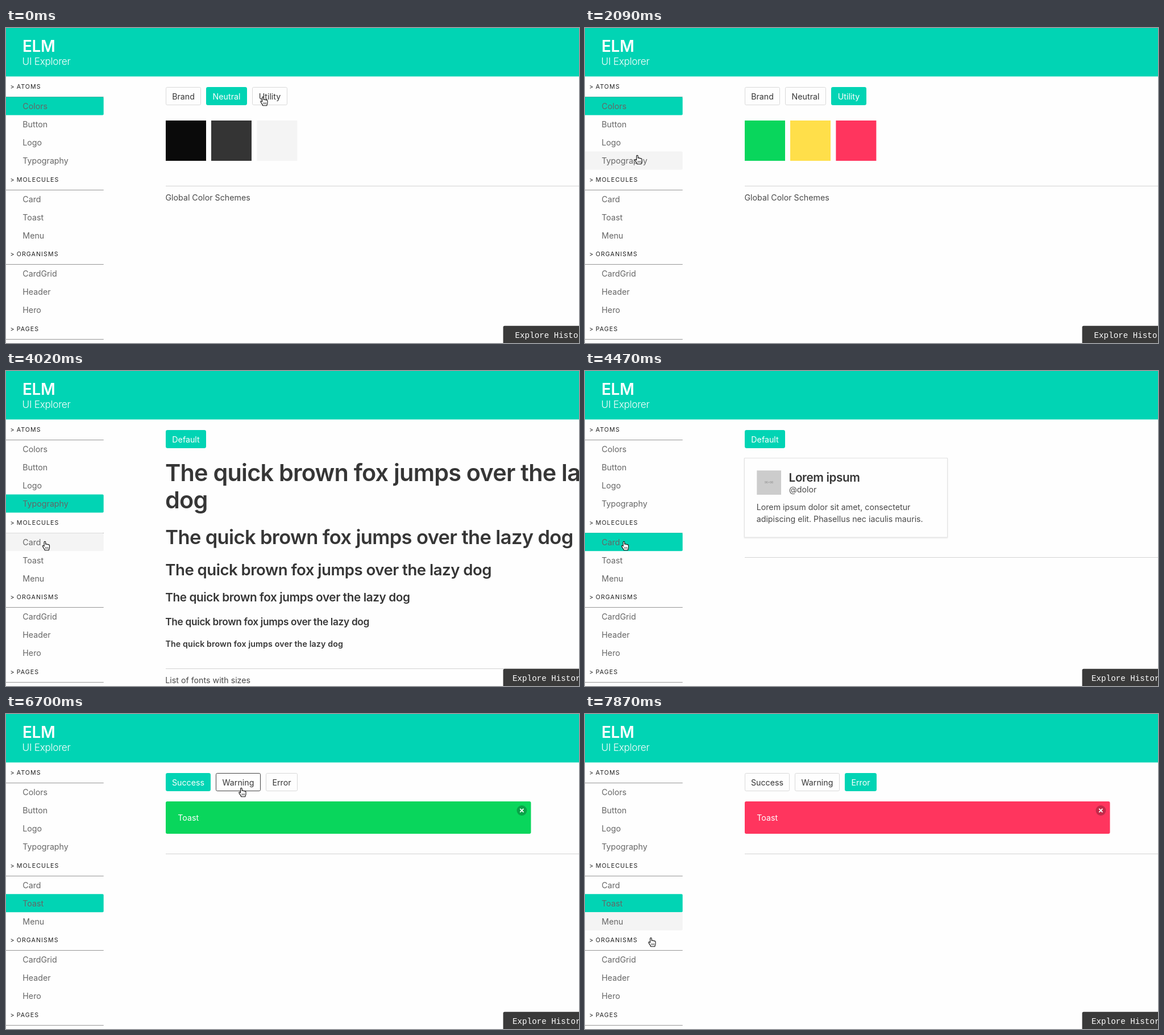
An HTML page that plays this animation: 1008x555 px, repeating every 8000 ms.

```html
<!DOCTYPE html>
<html lang="en">
<head>
<meta charset="utf-8">
<title>UI Explorer</title>
<style>
  html, body { margin: 0; width: 100%; height: 100%; overflow: hidden; background: #fefefe; }
  svg { display: block; width: 1008px; height: 555px; }
  text { font: 14.22px Inter, "Open Sans", sans-serif; font-optical-sizing: none; fill: #4a4a4a; white-space: pre; }
  .brand { font-size: 28px; font-weight: 600; letter-spacing: -.015em; fill: #fff; }
  .tagline { font-size: 17.3px; font-weight: 300; letter-spacing: -.018em; fill: #fff; }
  .label { font-size: 10.67px; letter-spacing: .1em; fill: #222; }
  .item text { fill: #666; }
  .item rect { fill: none; }
  .item.hover rect { fill: #f4f4f4; }
  .item.active rect { fill: #01d4b4; }
  .tab rect { fill: #fefefe; stroke: #d9d9d9; }
  .tab text { fill: #363636; }
  .tab.hover rect { stroke: #444; }
  .tab.active rect { fill: #01d4b4; stroke: #01d4b4; }
  .tab.active.hover rect { fill: #00c6a9; stroke: #00c6a9; }
  .tab.active text { fill: #fff; }
  .title { font-weight: 600; letter-spacing: -.0187em; fill: #363636; }
  .small { font-weight: 600; letter-spacing: .0088em; fill: #363636; }
  .tiny { font-size: 5px; fill: #8a8a8a; }
  .history { font: 14.22px "Liberation Mono", monospace; fill: #fff; }
  .card { filter: drop-shadow(0 1.8px 1.3px rgba(10, 10, 10, .1)); }
</style>
</head>
<body>
<svg id="stage" viewBox="0 0 1008 555"></svg>
<script>
const stage = document.getElementById('stage');

function add(parent, tag, attrs = {}, content) {
  const node = document.createElementNS('http://www.w3.org/2000/svg', tag);
  for (const key in attrs) node.setAttribute(key, attrs[key]);
  if (content) node.textContent = content;
  return parent.appendChild(node);
}
const group = (parent, cls = '') => add(parent, 'g', { class: cls });
const box = (parent, x, y, width, height, attrs) =>
  add(parent, 'rect', { x, y, width, height, ...attrs });
const label = (parent, x, y, content, cls = '', size) =>
  add(parent, 'text', { x, y, class: cls, ...(size && { style: `font-size:${size}px` }) }, content);
const rule = (parent, y) => box(parent, 281, y, 727, 1, { fill: '#d3d3d3' });

// Header
box(stage, 0, 0, 1008, 85.4, { fill: '#01d4b4' });
label(stage, 29, 42, 'ELM', 'brand');
label(stage, 28.5, 65, 'UI Explorer', 'tagline');

// Sidebar
const items = {};
function section(name, y, names) {
  label(stage, 7.5, y + 4, '>', 'label');
  label(stage, 18.7, y + 4, name, 'label');
  box(stage, 0, Math.floor(y + 18.4), 171.7, 1, { fill: '#969696' });
  names.forEach((itemName, i) => {
    const top = y + 18.6 + i * 32;
    const item = items[itemName] = group(stage, 'item');
    box(item, -4, top, 175.7, 32, { rx: 1.8 });
    label(item, 29.3, top + 21.3, itemName);
  });
}
section('ATOMS', 103, ['Colors', 'Button', 'Logo', 'Typography']);
section('MOLECULES', 266.7, ['Card', 'Toast', 'Menu']);
section('ORGANISMS', 398.4, ['CardGrid', 'Header', 'Hero']);
section('PAGES', 530, []);

// Scenes
const scenes = {}, tabs = {};
function scene(name, ...tabList) {
  const g = scenes[name] = group(stage);
  for (const [tabName, x, width] of tabList) {
    const tab = tabs[name + tabName] = group(g, 'tab');
    box(tab, x + .5, 104.5, width - 1, 31, { rx: 2.2 });
    add(tab, 'text', { x: x + width / 2, y: 125.6, 'text-anchor': 'middle' }, tabName);
  }
  return g;
}

const colors = scene('Colors', ['Brand', 281, 62], ['Neutral', 352, 72], ['Utility', 433, 62]);
const swatches = [281, 361, 441.4].map(x => box(colors, x, 163, 71, 71));
rule(colors, 278);
label(colors, 280.5, 304, 'Global Color Schemes');
const palettes = {
  Neutral: ['#0a0a0a', '#343434', '#f4f4f4'],
  Utility: ['#09d65c', '#ffdf4a', '#ff355e']
};

const typography = scene('Typography', ['Default', 281, 71]);
const pangram = 'The quick brown fox jumps over the lazy';
label(typography, 280, 194, pangram, 'title', 41.4);
label(typography, 280, 242, 'dog', 'title', 41.4);
for (const [y, size] of [[305.3, 34.5], [359.6, 27.6], [406, 20.7], [447.5, 17.25]])
  label(typography, 280.3, y, pangram + ' dog', 'title', size);
label(typography, 280.5, 485.7, pangram + ' dog', 'small');
rule(typography, 524);
label(typography, 280.3, 550, 'List of fonts with sizes');

const card = scene('Card', ['Default', 281, 71]);
box(card, 280.5, 153.5, 357, 139.5, { fill: '#fefefe', stroke: '#e2e2e2', class: 'card' });
box(card, 302.3, 175.3, 42.7, 42.7, { fill: '#ccc' });
add(card, 'text', { x: 323.6, y: 198, class: 'tiny', 'text-anchor': 'middle' }, '96×96');
label(card, 358.6, 195, 'Lorem ipsum', 'title', 20.7);
label(card, 359, 213.5, '@dolor');
label(card, 301.7, 245, 'Lorem ipsum dolor sit amet, consectetur');
label(card, 301.7, 266.3, 'adipiscing elit. Phasellus nec iaculis mauris.');
rule(card, 328);

const toast = scene('Toast', ['Success', 281, 79], ['Warning', 369, 79], ['Error', 457, 56]);
const banner = box(toast, 281, 154, 642.5, 57, { rx: 2.7 });
const message = label(toast, 302.3, 188, 'Toast');
add(toast, 'circle', { cx: 907.4, cy: 170, r: 8.9, fill: 'rgba(10,10,10,.25)' });
add(toast, 'path', { d: 'M904.3 166.9l6.2 6.2m0-6.2l-6.2 6.2', stroke: '#fff', 'stroke-width': 1.9 });
rule(toast, 246);
const toastFill = { Success: '#09d65c', Warning: '#ffdf4a', Error: '#ff355e' };

// History button
box(stage, 874.6, 524.7, 160, 40, { rx: 2.7, fill: '#3a3a3a' });
const history = label(stage, 895.5, 545.5, 'Explore History', 'history');

// Pointer
const pointer = group(stage);
add(pointer, 'path', {
  d: 'M-3.4-6.3c0-1.8 2.6-1.8 2.6 0v3.6c.4-1 2.3-.8 2.4.4.5-.8 2.2-.6 2.3.6.6-.7 2.1-.4 2.1 1V3' +
     'c0 1.8-1 2.6-1.2 4.8H-2.2C-2.6 5.6-4.8 3.6-6 1.2c-.7-1.5 1-2.2 2-1l.6.8z',
  fill: '#fff', stroke: '#111', 'stroke-width': 1.1, 'stroke-linejoin': 'round'
});
add(pointer, 'path', { d: 'M-.9 2.2v3.2M1.2 2.2v3.2M3.3 2.2v3.2', stroke: '#111', 'stroke-width': .8 });

// Time in ms, pointer centre, and what changes from there on
const cues = [
  [0, 454, 129, { page: 'Colors', tab: 'Neutral', hover: '' }],
  [140, 455, 129, { tab: 'Utility', hover: 'Utility' }],
  [320, 456, 129],
  [470, 457, 129],
  [620, 432, 133, { hover: '' }],
  [770, 300, 150],
  [910, 155, 168, { hover: 'Button' }],
  [1060, 116, 173],
  [1210, 113, 174],
  [1660, 112, 180],
  [1800, 106, 202, { hover: 'Logo' }],
  [1950, 98, 225, { hover: 'Typography' }],
  [2090, 94, 232],
  [2390, 94, 232, { page: 'Typography', tab: 'Default' }],
  [2990, 96, 232],
  [3140, 100, 232],
  [3290, 102, 232],
  [3580, 100, 240],
  [3725, 92, 264, { hover: '' }],
  [3870, 78, 294, { hover: 'Card' }],
  [4020, 70.5, 308],
  [4320, 70.5, 308, { page: 'Card' }],
  [4920, 71, 310],
  [5070, 70, 317],
  [5220, 69, 325, { hover: 'Toast' }],
  [5370, 67, 331],
  [5510, 65, 334],
  [5660, 64, 335],
  [5950, 64, 335, { page: 'Toast', tab: 'Success' }],
  [6100, 72, 332],
  [6250, 130, 296, { hover: '' }],
  [6400, 240, 220],
  [6550, 360, 156],
  [6700, 416, 138, { hover: 'Warning' }],
  [6850, 420, 135, { tab: 'Warning' }],
  [6990, 432, 131],
  [7140, 478, 128, { hover: 'Error' }],
  [7290, 484, 129, { tab: 'Error' }],
  [7430, 462, 146, { hover: '' }],
  [7580, 310, 260],
  [7720, 165, 368, { hover: 'Menu' }],
  [7870, 118, 402]
];
let state = {};
const steps = cues.map(([time, x, y, change]) => {
  state = { ...state, ...change, time, x, y };
  return state;
});

function mark(node, active, hover) {
  node.classList.toggle('active', active);
  node.classList.toggle('hover', hover);
}

function show({ x, y, page, tab, hover }) {
  for (const name in scenes) scenes[name].style.display = name === page ? '' : 'none';
  for (const name in items) mark(items[name], name === page, name === hover);
  for (const name in tabs) mark(tabs[name], name === page + tab, name === page + hover);
  if (page === 'Colors') swatches.forEach((s, i) => s.setAttribute('fill', palettes[tab][i]));
  if (page === 'Toast') {
    banner.setAttribute('fill', toastFill[tab]);
    message.style.fill = tab === 'Warning' ? 'rgba(0,0,0,.7)' : '#fff';
  }
  history.setAttribute('x', page === 'Colors' ? 895.5 : 891);
  pointer.setAttribute('transform', `translate(${x} ${y})`);
}

let shown;
function frame() {
  const time = performance.now() % 8000;
  const step = steps.findLast(s => s.time <= time);
  if (step !== shown) show(shown = step);
  requestAnimationFrame(frame);
}
frame();
</script>
</body>
</html>
```
